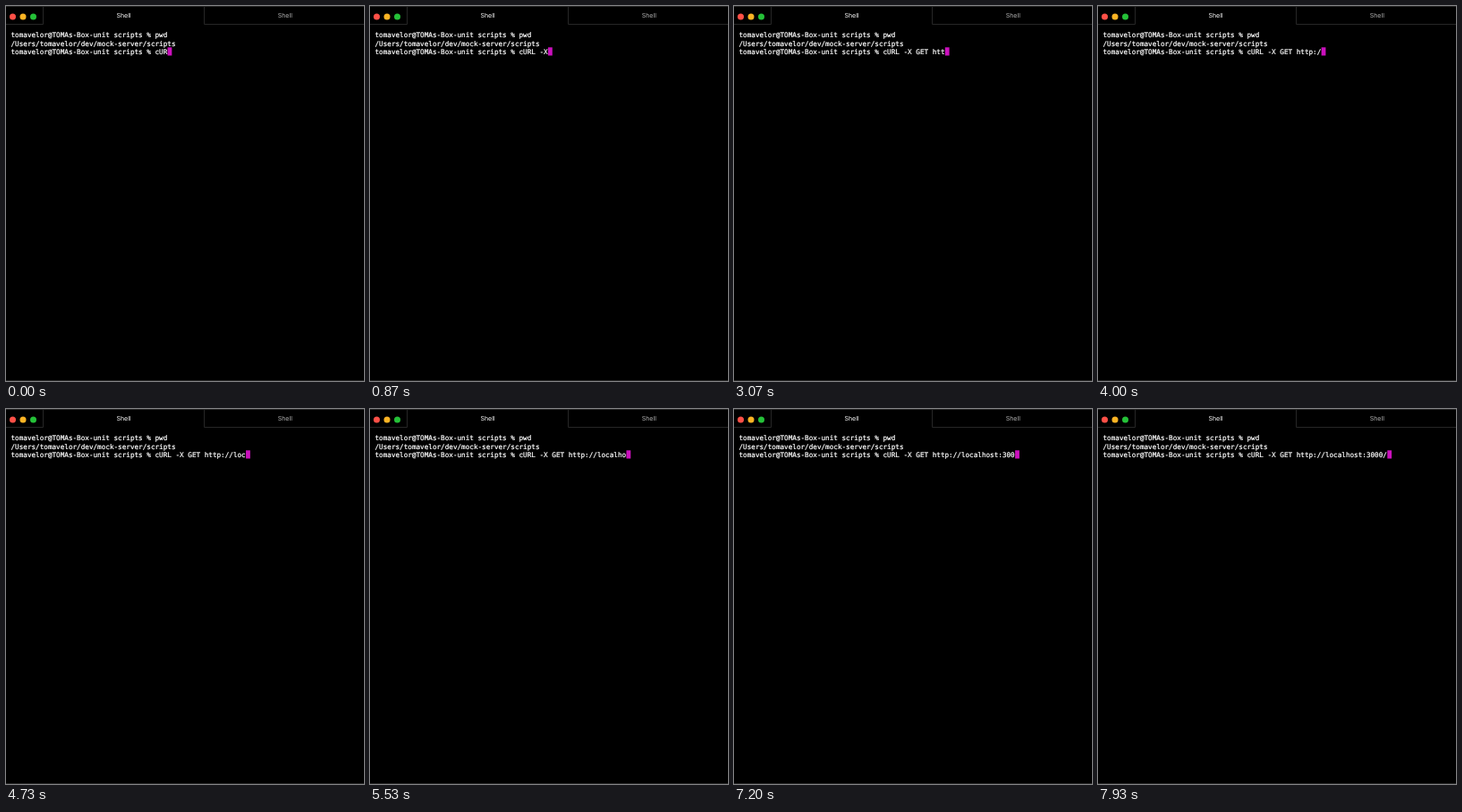
Write an HTML page that moves like this. It is 400 px wide and 420 px high and loops after 8 s.

```html
<!DOCTYPE html>
<html lang="en">
<head>
<meta charset="utf-8">
<title>Shell</title>
<style>
  html, body { margin: 0; width: 100%; height: 100%; overflow: hidden; background: #000; }
  svg { display: block; }
  text { text-rendering: geometricPrecision; white-space: pre; fill: #fff; }
  .term { font: 7.65px "DejaVu Sans Mono", monospace; stroke: #fff; stroke-width: .22px; }
  .tab { font: 7px Inter, sans-serif; text-anchor: middle; }
  .lines { fill: none; stroke: #262626; }
</style>
</head>
<body>
<svg width="400" height="420" viewBox="0 0 400 420">
  <path class="lines" d="M0 .5H400M0 20.5H41.5V0M400 20.5H221.5V0M0 419.5H400"/>
  <circle cx="7.5" cy="12" r="3.5" fill="#ff5047"/>
  <circle cx="19" cy="12" r="3.5" fill="#fdb424"/>
  <circle cx="30.5" cy="12" r="3.5" fill="#25c138"/>
  <text class="tab" x="131.5" y="13.3">Shell</text>
  <text class="tab" x="311.8" y="13.3" style="fill:#b4b4b4">Shell</text>
  <g class="term">
    <text x="5.5" y="35.4" id="first"></text>
    <text x="5.5" y="44.5">/Users/tomavelor/dev/mock-server/scripts</text>
    <text x="5.5" y="53.6" id="input"></text>
  </g>
  <rect id="cursor" y="46.3" width="4.8" height="9.2" fill="#cb10bd"/>
</svg>
<script>
  const LOOP = 8000, LEFT = 5.5, CHAR_WIDTH = 4.606;
  const prompt = 'tomavelor@TOMAs-Box-unit scripts % ';
  const command = 'cURL -X GET http://localhost:3000/';
  const alreadyTyped = 3;
  // Time of each further keystroke, in ms
  const keyTimes = [
    70, 530, 670, 870, 1070, 1330, 1400, 1600, 1870,
    2600, 2930, 3070, 3200, 3530, 3870, 4200,
    4400, 4530, 4670, 4800, 5000, 5270, 5400, 5600, 5800,
    6130, 6670, 6930, 7130, 7330, 7600
  ];
  const input = document.getElementById('input');
  const cursor = document.getElementById('cursor');
  document.getElementById('first').textContent = prompt + 'pwd';

  function draw() {
    const t = performance.now() % LOOP;
    const typed = alreadyTyped + keyTimes.filter(k => k <= t).length;
    const line = prompt + command.slice(0, typed);
    if (input.textContent !== line) {
      input.textContent = line;
      cursor.setAttribute('x', LEFT + line.length * CHAR_WIDTH);
    }
    requestAnimationFrame(draw);
  }
  draw();
</script>
</body>
</html>
```
